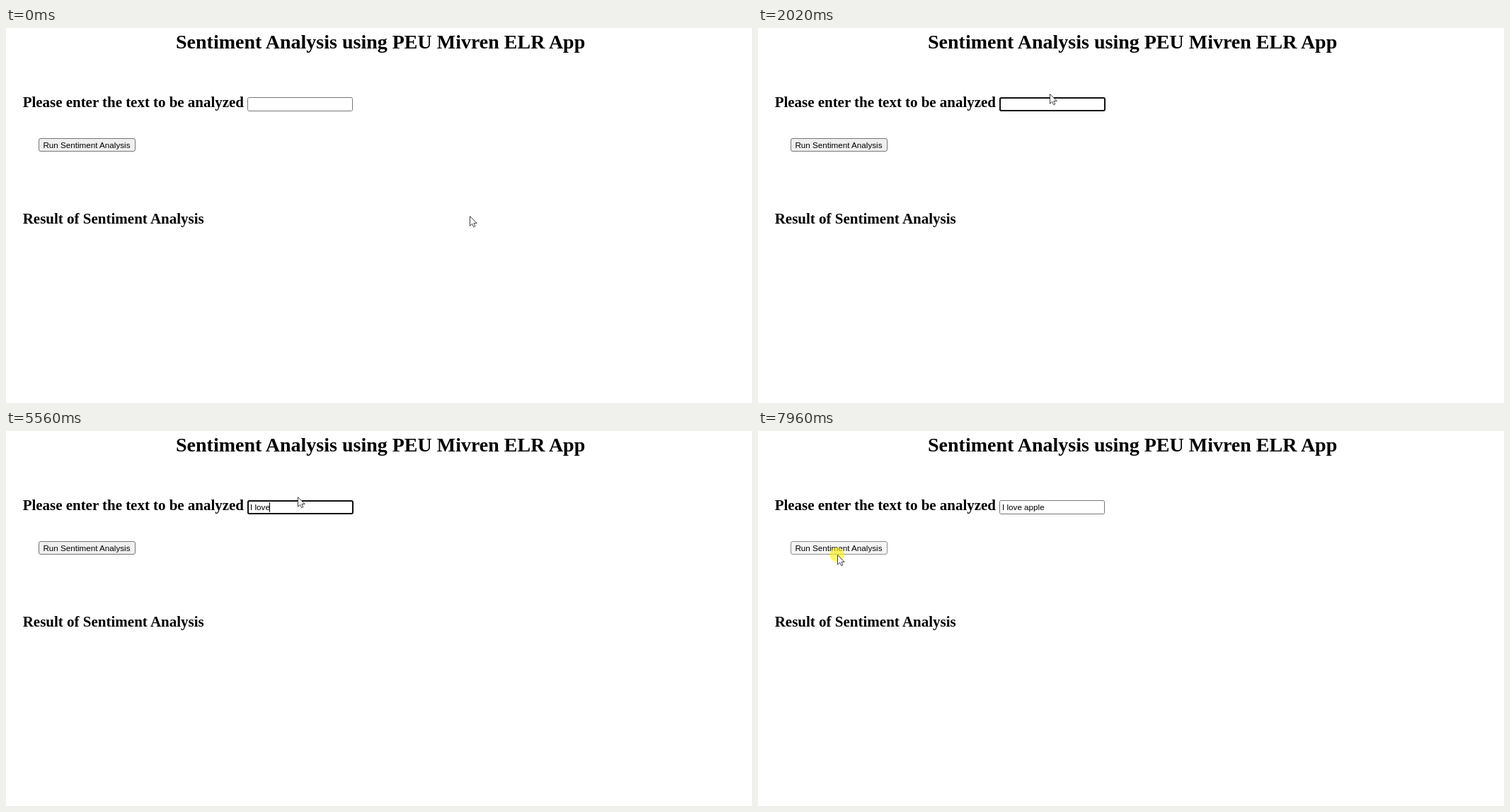
Write an HTML page that moves like this. It is 1054x531 px and loops after 8 s.

```html
<!DOCTYPE html>
<html lang="en">
<head>
<meta charset="utf-8">
<title>Sentiment Analysis</title>
<style>
  html, body { margin: 0; width: 100%; height: 100%; overflow: hidden; background: #fff; }
  svg { display: block; width: 100%; height: 100%; }
  text { white-space: pre; }
  .head { font: bold 21px "Liberation Serif", "Times New Roman", serif; }
  .title { font-size: 28px; }
  .label { letter-spacing: -.03px; }
  .ui { font: 11.667px "Liberation Sans", Arial, sans-serif; }
</style>
</head>
<body>
<svg viewBox="0 0 1054 531">
  <text class="head title" x="240" y="29">Sentiment Analysis using PEU Mivren ELR App</text>
  <text class="head label" x="23.7" y="112">Please enter the text to be analyzed</text>
  <text class="head" x="23.7" y="277">Result of Sentiment Analysis</text>

  <rect id="field" x="341.5" y="98.5" width="148" height="19" rx="2" fill="#fff" stroke="#767676"/>
  <rect id="ring" x="342" y="99" width="148" height="18" rx="2" fill="none" stroke="#101010" stroke-width="2"/>
  <text id="typed" class="ui" x="345" y="112"></text>
  <path id="squiggle" fill="none" stroke="#f00" stroke-width=".9"/>
  <rect id="caret" y="101" width="1" height="14"/>

  <rect id="button" x="46.5" y="156.5" width="136" height="18" rx="2.5"/>
  <text class="ui" x="52.4" y="170">Run Sentiment Analysis</text>

  <circle id="click" r="10.3" fill="#fff000" fill-opacity=".6"/>
  <path id="arrow" d="M.5 .6V14.2L3.6 11.3L5.7 15.7L7.9 14.7L5.9 10.4H10.2Z"
        fill="#fff" stroke="#2b2b2b" stroke-width=".9" stroke-linejoin="round"/>
  <path id="beam" d="M-3.5 -7H-1Q0 -7 0 -6Q0 -7 1 -7H3.5M0 -6V6M-3.5 7H-1Q0 7 0 6Q0 7 1 7H3.5"
        fill="none" stroke="#111" stroke-width="1.3"/>
</svg>
<script>
const LOOP = 8000, BLINK = 530, STEP = 50;
const PRESS = 1450, RELEASE = 1550, RUN = 7960;

// Pointer path: time, x, y
const path = [
  [629, 655, 266], [630, 653, 249], [700, 612, 217], [800, 512, 162],
  [900, 412, 122], [980, 355, 109], [1030, 340, 107], [1130, 350, 111],
  [1230, 370, 116], [1699, 370, 116], [1700, 392, 105], [1750, 412, 93],
  [7149, 412, 93], [7150, 400, 79], [7200, 330, 49], [7250, 245, 73],
  [7300, 167, 116], [7350, 132, 150], [7400, 116, 170], [7500, 110, 178],
  [7650, 111, 177], [7850, 112, 175]
];

// Field contents: time, text, caret phase
const edits = [
  [1490, ''], [2510, 'I'], [2660, 'I '], [2980, 'I l'], [3180, 'I lo'],
  [3430, 'I lov'], [3530, 'I love'], [3730, 'I lovea'], [3900, 'I lovea '],
  [4400, 'I lovea p'], [4910, 'I lovea ', BLINK], [5460, 'I lovea'],
  [5510, 'I love'], [5870, 'I love '], [6030, 'I love a'], [6330, 'I love ap'],
  [6430, 'I love app'], [6630, 'I love appl'], [6750, 'I love apple']
];

const el = id => document.getElementById(id);
const [field, ring, typed, squiggle, caret, button, click, arrow, beam] =
  ['field', 'ring', 'typed', 'squiggle', 'caret', 'button', 'click', 'arrow', 'beam'].map(el);
const show = (node, on) => node.setAttribute('visibility', on ? 'visible' : 'hidden');
const place = (node, x, y) => node.setAttribute('transform', `translate(${x} ${y})`);
const within = (v, lo, hi) => v >= lo && v < hi;

const pen = document.createElement('canvas').getContext('2d');
pen.font = '11.667px "Liberation Sans", Arial, sans-serif';
squiggle.setAttribute('d', 'M351.5 114' + 'q.85 -1.6 1.7 0t1.7 0'.repeat(8));

function pointer(t) {
  const from = t < 1700 ? 630 : t < 7150 ? 1700 : 7150;
  const s = from + Math.floor((t - from) / STEP) * STEP;
  const i = path.findIndex(p => p[0] > s);
  if (i === 0) return path[0].slice(1);
  if (i < 0) return path[path.length - 1].slice(1);
  const [t0, x0, y0] = path[i - 1], [t1, x1, y1] = path[i];
  const k = (s - t0) / (t1 - t0);
  return [Math.round(x0 + (x1 - x0) * k), Math.round(y0 + (y1 - y0) * k)];
}

function drawField(t) {
  const focused = within(t, PRESS, RUN);
  const [at, text, phase = 0] = edits.filter(e => e[0] <= t).pop() || edits[0];
  const age = t - at + phase;
  typed.textContent = t < at ? '' : text;
  caret.setAttribute('x', Math.floor(345 + pen.measureText(text).width));
  show(caret, focused && age % (2 * BLINK) < BLINK);
  show(ring, focused);
  show(squiggle, within(t, 4000, 5510));
}

function drawPointer(t) {
  const [x, y] = pointer(t);
  const overField = within(x, 340, 491) && within(y, 98, 118);
  const overButton = within(x, 46, 183) && within(y, 156, 176);
  const pressed = t >= RUN;
  place(arrow, x, y);
  place(beam, x, y - .5);
  place(click, x, y);
  show(arrow, !overField);
  show(beam, overField);
  show(click, pressed || within(t, PRESS, RELEASE));
  field.setAttribute('stroke', overField ? '#4f4f4f' : '#767676');
  button.setAttribute('fill', pressed ? '#f5f5f5' : overButton ? '#e5e5e5' : '#efefef');
  button.setAttribute('stroke', pressed ? '#8d8d8d' : overButton ? '#4f4f4f' : '#767676');
}

const start = performance.now();
function frame() {
  const t = (performance.now() - start) % LOOP;
  drawField(t);
  drawPointer(t);
  requestAnimationFrame(frame);
}
frame();
</script>
</body>
</html>
```
